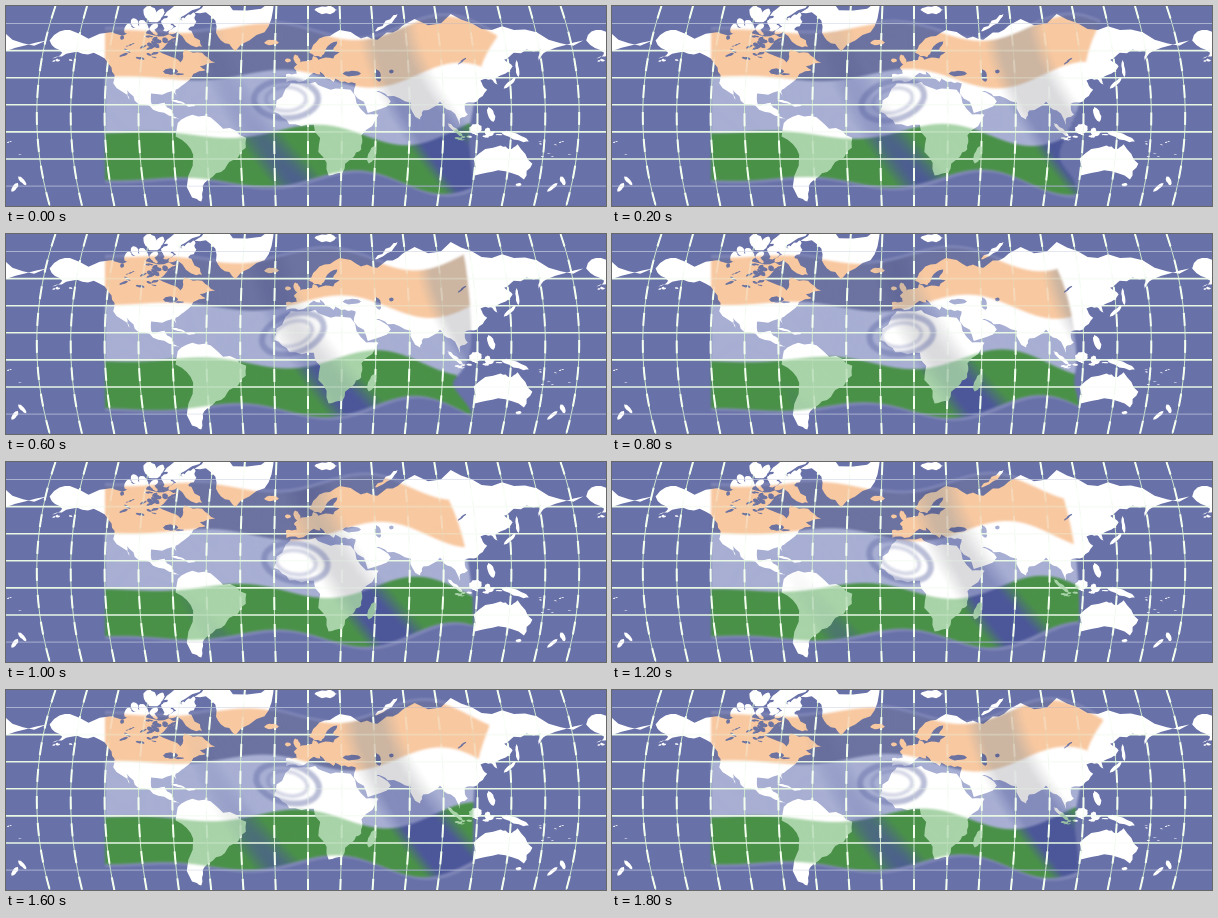
Animation of 600 by 200 pixels, one loop 1900 ms. Source, as an HTML page with a canvas:

```html
<!DOCTYPE html>
<html lang="en">
<head>
<meta charset="utf-8">
<title>Flag waving over a world map</title>
<style>
html, body { margin: 0; width: 100%; height: 100%; overflow: hidden; background: #6871a8; }
canvas { display: block; width: 600px; height: 200px; }
</style>
</head>
<body>
<canvas id="stage" width="600" height="200"></canvas>
<script>
const W = 600, H = 200, LOOP = 1900, STEP = 200, POSES = 9, WAVE = 180, LEFT = 99;
const TURN = 2 * Math.PI, SEA = '#6871a8';

const layer = () => Object.assign(document.createElement('canvas'), { width: W, height: H }).getContext('2d');
const stage = document.getElementById('stage').getContext('2d');
const mask = layer(), cloth = layer(), ground = layer(), grid = layer();

let seed = 7;
const random = () => (seed = seed * 16807 % 2147483647) / 2147483647;
const spread = size => (random() - 0.5) * size;
const clamp = k => Math.min(1, Math.max(0, k));

// Map projection: meridians bow outwards, the far north is stretched.
const bow = y => 1 - 0.058 * ((y - 109) / 100) ** 2;
const project = (lon, lat) => {
  const y = 124 - 1.3 * lat - 0.03 * Math.max(0, lat - 55) ** 2;
  return [294 + 1.54 * lon * bow(y), y];
};

// Breaks every edge at a displaced midpoint, which makes a ragged coast.
function roughen(points, depth) {
  if (!depth) return points;
  const finer = points.flatMap(([x, y], i) => {
    const [u, v] = points[(i + 1) % points.length], k = spread(0.3);
    return [[x, y], [(x + u) / 2 + (v - y) * k, (y + v) / 2 - (u - x) * k]];
  });
  return roughen(finer, depth - 1);
}

function fill(points, depth, mode = 'source-over') {
  const edge = roughen(points, depth);
  mask.globalCompositeOperation = mode;
  for (const turn of [-360, 0, 360]) {
    mask.beginPath();
    edge.forEach(([lon, lat]) => mask.lineTo(...project(lon + turn, lat)));
    mask.fill();
  }
}
const land = text => fill(text.split(',').map(p => p.trim().split(' ').map(Number)), 2);

function blob(lon, lat, rx, ry, tilt = 0, mode) {
  const points = Array.from({ length: 8 }, (_, i) => {
    const a = i * TURN / 8, x = rx * Math.cos(a), y = ry * Math.sin(a);
    return [lon + x * Math.cos(tilt) - y * Math.sin(tilt), lat + x * Math.sin(tilt) + y * Math.cos(tilt)];
  });
  fill(points, 1, mode);
}
const lake = (lon, lat, rx, ry, tilt) => blob(lon, lat, rx, ry, tilt, 'destination-out');

function scatter(draw, count, lon, lat, width, height, size) {
  while (count--) {
    draw(lon + spread(width), lat + spread(height), size * (0.6 + random()), size * (0.2 + 0.4 * random()), spread(1));
  }
}

function drawWorld() {
  // The Americas and Greenland
  land(`-168 66,-156 71,-128 70,-95 68,-82 68,-94 60,-82 55,-79 52,-77 61,-65 59,-56 52,-66 49,-62 46,-70 43,
    -76 35,-81 31,-80 25,-83 30,-97 28,-96 19,-88 21,-83 15,-82 9,-78 8,-92 14,-105 20,-113 31,-111 23,
    -122 36,-124 48,-137 59,-152 59,-164 55,-158 59`);
  land('-77 8,-62 11,-50 1,-35 -6,-40 -20,-48 -27,-58 -36,-65 -43,-67 -55,-73 -52,-70 -19,-81 -5');
  land('-73 78,-55 84,-18 83,-24 70,-43 60,-53 66,-58 75');
  // Africa
  land(`-6 36,10 37,20 31,33 31,43 12,51 12,40 -4,40 -15,35 -21,28 -33,19 -35,12 -17,9 4,-7 4.5,-17 14,-10 30`);
  // Europe
  land(`-9 37,-9 43,-2 43.5,-4 48,8 54,9 57,12 54,22 55,29 60,22 61,25 65.5,17 61,14 56,6 59,13 67,27 71,
    41 67,45 68,60 69,60 40,50 38,36 36,27 37,23 40,22 37,13 45,17 39,9 44,-1 37`);
  // Asia
  land(`55 68,70 73,104 77.5,130 71,160 70,190 66,164 60,157 51,160 61,142 59,135 54,140 49,128 40,129 35,
    125 39,118 38,122 31,115 22,107 20,109 12,104 9,103 2,98 15,91 22,80 15,78 8,72 21,57 26,49 30,59 22,
    44 13,35 28,36 41`);
  // Australia
  land('114 -22,131 -12,137 -15,142 -11,153 -26,149 -38,131 -31,116 -35');

  // Islands
  blob(-75, 68, 11, 3, -0.5);
  blob(-80, 79.5, 14, 2.5, 0.2);
  blob(-110, 71, 8, 2);
  blob(-19, 65, 5, 1.3);
  blob(-2, 54, 2, 4, 0.3);
  blob(-8, 53.5, 2, 1.5);
  blob(18, 79, 8, 1.2);
  blob(59, 74, 9, 1, 0.4);
  blob(137, 36, 6, 1.3, 0.8);
  blob(143, 47, 1, 7);
  blob(47, -19, 2.4, 7, -0.25);
  blob(114, 1, 4.5, 4, 0.5);
  blob(101, 0, 7.5, 1.5, -0.8);
  blob(140, -5, 10, 2.5, -0.4);
  blob(122, -1, 2, 3);
  blob(124, 12, 2, 6, 0.3);
  blob(146, -42, 2, 1.3);
  blob(175, -39, 1.5, 4, 0.5);
  blob(169, -44, 1.3, 4.5, -0.7);
  blob(-79, 21.5, 5, 0.8, -0.3);
  blob(-71, 19, 3, 1);
  scatter(blob, 22, -97, 74, 46, 8, 4);
  scatter(blob, 10, 118, -6, 32, 7, 2);
  scatter(blob, 10, 165, -14, 26, 14, 0.8);
  scatter(blob, 5, -160, 54, 22, 3, 1.5);

  // Inland seas and lakes
  lake(34, 43.5, 6, 2);
  lake(51, 42, 2, 5, 0.2);
  lake(60, 45, 1.5, 1.5);
  lake(107, 53, 4, 0.7, 0.7);
  lake(-85, 45, 5, 2.5);
  lake(-79, 43, 3, 0.7);
  scatter(lake, 12, -109, 61, 30, 14, 2);
  scatter(lake, 8, -90, 65, 24, 8, 2.5);
}

function drawGrid() {
  const line = (points, width, colour, dash = []) => {
    grid.beginPath();
    points.forEach(p => grid.lineTo(...p));
    grid.setLineDash(dash);
    grid.lineWidth = width;
    grid.strokeStyle = colour;
    grid.stroke();
  };
  for (let i = -8; i <= 8; i++) {
    const points = [];
    for (let y = 0; y <= H; y += 5) points.push([302 + 33.9 * i * bow(y), y]);
    line(points, 1, '#cfe8cd');
    line(points, 2, '#f4fff0', [13, 14]);
  }
  for (let i = 0; i < 7; i++) {
    const y = 17.5 + 27.1 * i, faint = i === 0 || i === 6;
    line([[0, y], [W, y]], faint ? 1 : 1.6, faint ? '#a9b3d0' : '#e8f8e4');
  }
}

// Colours of each stripe: plain, then in the shade of a fold.
const LAND = [
  [[248, 200, 160], [204, 181, 161]],
  [[255, 255, 255], [219, 219, 222]],
  [[168, 211, 168], [150, 190, 160]]
];
const OCEAN = [
  [[108, 115, 160], [96, 103, 150]],
  [[168, 175, 211], [132, 140, 188]],
  [[74, 145, 72], [76, 87, 153]]
];
const mix = (a, b, k) => `rgb(${a.map((p, i) => Math.round(p + (b[i] - p) * k))})`;

function drawFlag(ctx, colours, pose) {
  const rows = 48, cell = 2;
  const swing = lag => Math.cos((pose - lag) * TURN / POSES);
  const crest = v => 345 + 90 * Math.max(0, v) ** 1.5 + WAVE / POSES * pose;
  const reach = x => (x - LEFT) / 370;
  const height = (x, v) => 24 + 150 * v + 15 * reach(x) * Math.cos(TURN * (x - crest(v)) / WAVE);
  // The top corner swings to and fro; the green edge is tucked in for part of the loop.
  const end = v => 467 + 24 * swing(0.2) * Math.max(0, 1 - v) ** 3
    - 26 * Math.max(0, swing(2)) * Math.exp(-(((v - 0.75) / 0.14) ** 2));

  cloth.clearRect(0, 0, W, H);
  for (let r = -1; r <= rows; r++) {
    const v = r / rows, next = (r + 1) / rows, right = end(v);
    const hem = r < 0 || r === rows;
    if (hem && colours === LAND) continue;
    const stripe = colours[v < 0.31 ? 0 : v < 0.67 ? 1 : 2];
    for (let x = LEFT; x < right; x += cell) {
      const gap = x - crest(v) - 35;
      const d = (gap - WAVE * Math.round(gap / WAVE)) / 29;
      const shade = clamp((Math.exp(-d * d) * reach(x) ** 0.7 - 0.3) * 2.6);
      const y = height(x, v);
      cloth.fillStyle = hem ? 'rgba(150,156,198,.5)' : mix(...stripe, shade);
      cloth.fillRect(x, y, Math.min(cell, right - x), height(x, next) - y + (hem ? 0 : 0.6));
    }
  }
  drawWheel(swing);

  ctx.filter = 'blur(1px)';
  ctx.drawImage(cloth.canvas, 0, 0);
  ctx.filter = 'none';
}

function drawWheel(swing) {
  const x = 285 + 5 * swing(4.7), y = 97 + 4 * swing(4.2), tilt = -0.4 * swing(2.2);
  const ring = (rx, ry, width, alpha) => {
    cloth.beginPath();
    cloth.ellipse(x, y, rx, ry, tilt, 0, TURN);
    cloth.lineWidth = width;
    cloth.strokeStyle = `rgba(92,101,160,${alpha})`;
    cloth.stroke();
  };
  ring(32, 19, 6, 0.42);
  ring(20, 12, 4, 0.25);
}

function paint(pose) {
  stage.fillStyle = SEA;
  stage.fillRect(0, 0, W, H);
  drawFlag(stage, OCEAN, pose);
  stage.drawImage(grid.canvas, 0, 0);

  ground.globalCompositeOperation = 'source-over';
  ground.fillStyle = '#fff';
  ground.fillRect(0, 0, W, H);
  drawFlag(ground, LAND, pose);
  ground.globalAlpha = 0.3;
  ground.drawImage(grid.canvas, 0, 0);
  ground.globalAlpha = 1;
  ground.globalCompositeOperation = 'destination-in';
  ground.drawImage(mask.canvas, 0, 0);
  stage.drawImage(ground.canvas, 0, 0);
}

let shown = -1;
function tick() {
  const pose = Math.floor(performance.now() % LOOP / STEP) % POSES;
  if (pose !== shown) paint(shown = pose);
  requestAnimationFrame(tick);
}

drawWorld();
drawGrid();
tick();
</script>
</body>
</html>
```
